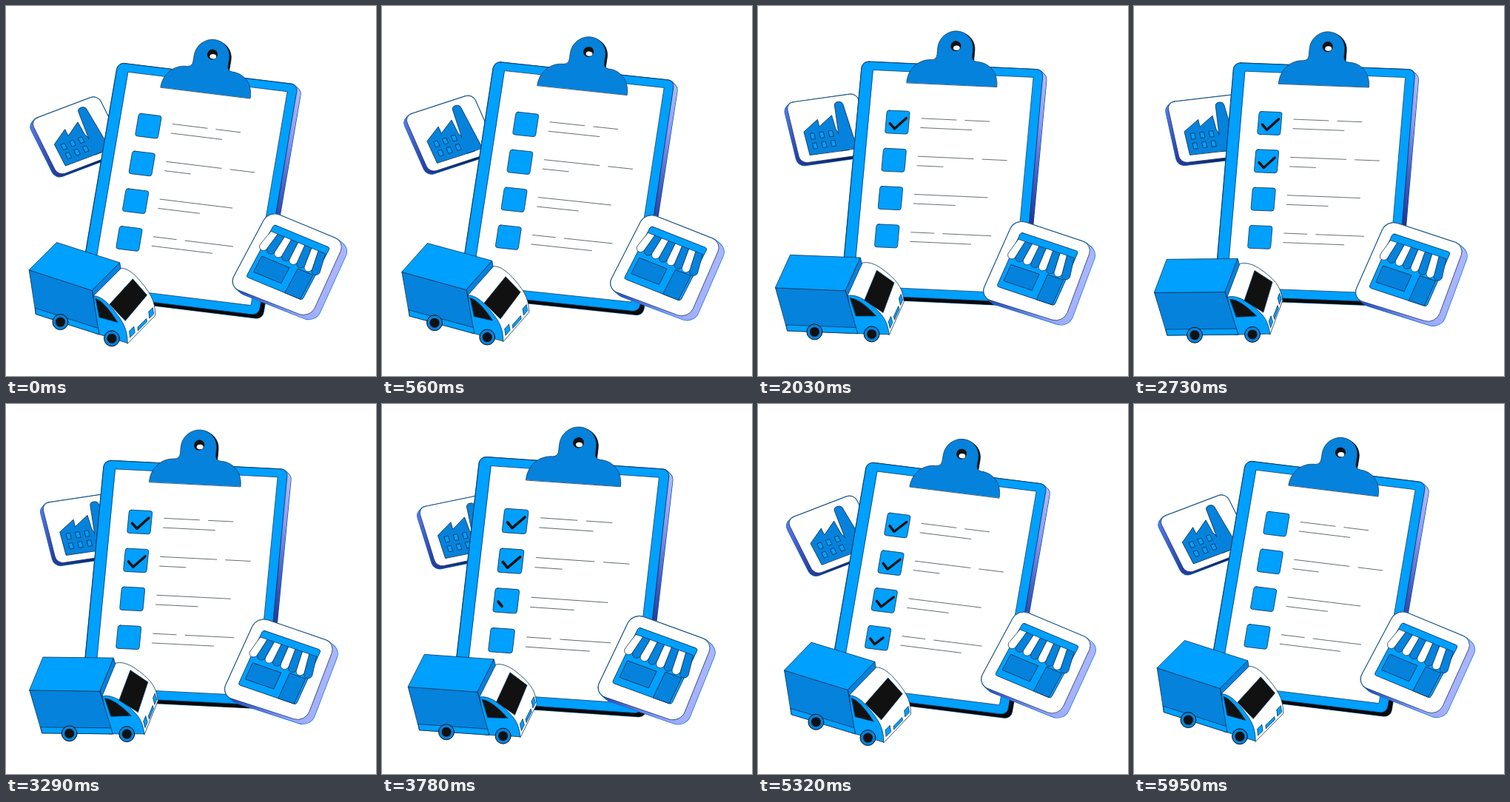
Recreate the animation shown at these times as an HTML page with a canvas. Size 500 px wide and 500 px high, loop 6020 ms.

```html
<!DOCTYPE html>
<html lang="en">
<head>
<meta charset="utf-8">
<title>Delivery checklist</title>
<style>
html, body { margin: 0; width: 100%; height: 100%; overflow: hidden; background: #fff; }
canvas { display: block; width: 500px; height: 500px; }
</style>
</head>
<body>
<canvas id="stage" width="500" height="500"></canvas>
<script>
const ctx = document.getElementById('stage').getContext('2d');
const LOOP = 6020, STEP = 70, CYCLE = 5950;
const BRIGHT = '#00a0ff', MID = '#0582dc', LINE = '#0b3558', INK = '#111';
const RAD = Math.PI / 180;
const clamp = v => Math.max(0, Math.min(1, v));

// everything floats on one slow sine per coordinate
const turn = t => 2 * Math.PI * t / CYCLE;
const sway = (t, mean, c, s) => mean + c * Math.cos(turn(t)) + s * Math.sin(turn(t));

// short swell of the board and the shop
const swell = t => Math.cos(Math.PI / 2 * Math.min(1, Math.abs(t - 3780) / 750)) ** 2;

function pose({ x, y, angle, skew, scale = 1 }, dx = 0, dy = 0) {
  const r = angle * RAD, v = r + skew * RAD;
  ctx.setTransform(scale * Math.cos(r), scale * Math.sin(r),
    -scale * Math.sin(v), scale * Math.cos(v), x + dx, y + dy);
}

function paint(path, fill, stroke = LINE, width = 0.8) {
  if (fill) { ctx.fillStyle = fill; ctx.fill(path); }
  if (stroke) { ctx.strokeStyle = stroke; ctx.lineWidth = width; ctx.stroke(path); }
}

function box(x0, y0, x1, y1, r = 0) {
  const p = new Path2D();
  p.roundRect(x0, y0, x1 - x0, y1 - y0, r);
  return p;
}

function poly(points) {
  const p = new Path2D();
  points.forEach(([x, y]) => p.lineTo(x, y));
  p.closePath();
  return p;
}

function rounded(points, r) {
  const p = new Path2D(), [a, b] = [points[0], points[1]];
  p.moveTo((a[0] + b[0]) / 2, (a[1] + b[1]) / 2);
  points.forEach((_, i) => {
    const corner = points[(i + 1) % points.length], next = points[(i + 2) % points.length];
    p.arcTo(...corner, ...next, r);
  });
  p.closePath();
  return p;
}

function disc(x, y, rx, ry = rx) {
  const p = new Path2D();
  p.ellipse(x, y, rx, ry, 0, 0, 7);
  return p;
}

function gradient(x0, y0, x1, y1, colors) {
  const g = ctx.createLinearGradient(x0, y0, x1, y1);
  colors.forEach((color, i) => g.addColorStop(i / (colors.length - 1), color));
  return g;
}

// sweeps a shape along a screen offset to give it thickness
function extrude(at, path, dx, dy, fill, edge) {
  for (const outline of [true, false]) {
    for (let i = 8; i >= 0; i--) {
      pose(at, dx * i / 8, dy * i / 8);
      if (outline) paint(path, null, edge, 1.4);
      else paint(path, fill, null);
    }
  }
}

function drawFactory(t) {
  const at = {
    x: sway(t, 100.5, -3.4, -8), y: sway(t, 170.7, 4.2, -3.7),
    angle: sway(t, -14, -6.8, 2.8), skew: -5.7
  };
  const tile = box(-48.5, -42, 48.5, 42, 10);
  extrude(at, tile, -3.5, 4, gradient(-48, -40, 20, 42, ['#5f78e8', '#2c40a8', '#101c58']), '#0878cc');
  paint(tile, '#fff', LINE, 0.7);

  paint(poly([[-33.5, 32.5], [-34, 0], [-12, -14], [-12, -4], [8, -17], [9, 2], [20, 32.5]]), MID);
  paint(new Path2D('M9 32.5 L15 -30 Q16 -34 20.5 -34 Q25.5 -34 26.5 -30 L31 32 Z'), MID);
  paint(box(5, 10, 22, 32), MID, null);
  for (const y of [7.5, 21])
    for (let x = -23.5; x < 3; x += 12.5)
      paint(box(x - 2.6, y - 4, x + 2.6, y + 4), BRIGHT);
}

// per row: end of the first stroke, span of the next one, end of the lower line
const ROWS = [[79, 91, 124, 101], [107, 119, 152, 67], [130, 130, 130, 88], [63, 75, 140, 114]];
const ROW = 51.5;

function drawTick(part) {
  if (part <= 0) return;
  const first = clamp(part * 3), rest = clamp(part * 1.5 - 0.5);
  ctx.beginPath();
  ctx.moveTo(-10, 2);
  ctx.lineTo(-10 + 7 * first, 2 + 7 * first);
  if (rest > 0) ctx.lineTo(-3 + 14.5 * rest, 9 - 15 * rest);
  ctx.strokeStyle = INK;
  ctx.lineWidth = 3.4;
  ctx.stroke();
}

function drawRow(t, i) {
  const [a, b, c, d] = ROWS[i];
  paint(box(-15.5, -15.5, 15.5, 15.5, 3), BRIGHT);
  paint(new Path2D(`M32 -6.6H${a}M${b} -6.6H${c}M32 6H${d}`), null, '#5b676d', 0.9);
  const drawn = (t - 3675 + 1330 * (2 - i)) / 400, left = (5880 - t) / 210;
  drawTick(Math.min(clamp(drawn), clamp(left)));
}

function drawBoard(t) {
  const k = swell(t);
  const at = {
    x: sway(t, 187.2, 5.2, 4.8), y: sway(t, 160.7, 1.4, -3.5) - 4 * k,
    angle: sway(t, 4.7, 2.3, -1), skew: 2.65, scale: 1 + 0.05 * k
  };
  const back = box(-55, -80, 190, 236, 9);
  extrude(at, back, 5, 5, gradient(0, -80, 0, 190,
    ['#b4bcff', '#8c9bf2', '#4a62c8', '#22369a', '#080808']), '#0a4f8a');
  paint(back, BRIGHT);
  paint(box(-39, -69, 177.5, 224), '#fff', LINE, 0.7);

  ctx.save();
  ctx.translate(2.6, 1.4);
  paint(new Path2D('M45 -86 V-103 A23.8 23.8 0 0 1 92.6 -103 V-86 Z'), INK, INK);
  ctx.restore();
  paint(new Path2D('M7.5 -54 C7 -72 20 -86.5 38 -86.5 Q45 -87 45 -94 V-103 ' +
    'A23.8 23.8 0 0 1 92.6 -103 V-94 Q92.6 -87 99.6 -86.5 C117 -86.5 130 -72 129.5 -54 Z'), MID, LINE, 0.7);
  paint(disc(69.2, -106.5, 7), INK, null);
  paint(disc(70.5, -104, 4.4, 3.2), '#fff', null);

  for (let i = 0; i < ROWS.length; i++) {
    drawRow(t, i);
    ctx.translate(0, ROW);
  }
}

function drawShop(t) {
  const at = {
    x: sway(t, 373.9, 5, 5.3), y: sway(t, 353.8, -5.2, 1.3),
    angle: sway(t, 20.5, 2, -1.1), skew: 5.5, scale: 1 + 0.04 * swell(t)
  };
  const tile = rounded([[-55, -58], [56, -58], [63, 56], [-55, 58]], 15);
  extrude(at, tile, 7, 6, gradient(-50, 40, 65, 20, ['#2c46b8', '#5a70dc', '#8f9cff', '#aab4ff']), '#0878cc');
  paint(tile, '#fff', LINE, 0.7);

  paint(box(-40, -43, 42, 37, 3), BRIGHT);
  paint(box(-34, 3, 6, 27), MID);
  paint(box(17, 0, 39, 37), MID);
  for (let i = 0; i < 8; i++) {
    const top = -39 + i * 9.9, low = -44 + i * 11.2, y = -10 + i * 0.5;
    const p = new Path2D();
    p.moveTo(top, -33);
    p.lineTo(top + 9.9, -33);
    p.lineTo(low + 11.2, y);
    p.arc(low + 5.6, y, 5.6, 0, Math.PI);
    p.closePath();
    paint(p, i % 2 ? MID : '#fff', LINE, 0.7);
  }
}

function drawTruck(t) {
  // one heading steers the length, height and depth axes
  const h = sway(t, 8.65, 9.1, -1.8);
  const axis = (len, deg) => [len * Math.cos(deg * RAD), len * Math.sin(deg * RAD)];
  const [lx, ly] = axis(95.5 - 0.33 * h, h);
  const [hx, hy] = axis(60.5, 73 + 0.44 * h);
  const [dx, dy] = axis(48.3 + 0.26 * h, 1.33 * h - 68.5);
  const ox = sway(t, 30, 0.9, -7.4), oy = sway(t, 372.3, -15.5, 0.2);
  const at = (a, b, c = 0) => [ox + a * lx + b * hx + c * dx, oy + a * ly + b * hy + c * dy];
  const face = points => poly(points.map(p => at(...p)));
  ctx.setTransform(1, 0, 0, 1, 0, 0);

  paint(face([[1, 0, 0], [1, 0, 1], [1, 0.3, 1], [1, 0.3, 0]]), MID);

  // nose profile, the same on the near and far side
  const nose = (p, c) => {
    p.lineTo(...at(1.01, 0.12, c));
    p.quadraticCurveTo(...at(1.13, 0.07, c), ...at(1.25, 0.22, c));
    p.quadraticCurveTo(...at(1.38, 0.4, c), ...at(1.43, 0.56, c));
    p.quadraticCurveTo(...at(1.48, 0.72, c), ...at(1.45, 0.99, c));
  };
  const front = new Path2D();
  front.moveTo(...at(1.01, 0.12));
  nose(front, 1);
  front.lineTo(...at(1.45, 1));
  front.closePath();
  paint(front, '#fff');

  const side = new Path2D();
  nose(side, 0);
  side.lineTo(...at(0.95, 1));
  side.closePath();
  paint(side, BRIGHT);

  paint(face([[1.2, 0.29, 0.1], [1.21, 0.23, 0.93], [1.42, 0.48, 0.9], [1.42, 0.56, 0.1]]), INK);
  const pane = new Path2D();
  pane.moveTo(...at(1.04, 0.17));
  pane.quadraticCurveTo(...at(1.18, 0.18), ...at(1.34, 0.57));
  pane.lineTo(...at(1.05, 0.59));
  pane.closePath();
  paint(pane, INK);

  const badge = (b0, b1, c0, c1) =>
    paint(face([[1.455, b0, c0], [1.455, b0, c1], [1.455, b1, c1], [1.455, b1, c0]]), BRIGHT);
  badge(0.78, 0.92, 0.1, 0.27);
  badge(0.78, 0.92, 0.8, 0.95);
  badge(0.87, 0.94, 0.38, 0.7);

  paint(face([[0, 0], [1, 0], [1, 1], [0, 1]]), MID);
  paint(face([[0, 0.86], [1, 0.86], [1, 1], [0, 1]]), BRIGHT);
  paint(face([[0, 0, 0], [0, 0, 1], [1, 0, 1], [1, 0, 0]]), BRIGHT);

  for (const a of [0.385, 1.2]) {
    const [x, y] = at(a, 1);
    paint(disc(x, y, 10.5), MID, INK, 1);
    paint(disc(x, y, 6.5), INK, null);
  }
}

function draw(now) {
  const t = Math.floor((now % LOOP) / STEP) * STEP % CYCLE;
  ctx.setTransform(1, 0, 0, 1, 0, 0);
  ctx.fillStyle = '#fff';
  ctx.fillRect(0, 0, 500, 500);
  ctx.lineCap = ctx.lineJoin = 'round';
  drawFactory(t);
  drawBoard(t);
  drawShop(t);
  drawTruck(t);
}

let start;
function tick(now) {
  start ??= now;
  draw(now - start);
  requestAnimationFrame(tick);
}
draw(0);
requestAnimationFrame(tick);
</script>
</body>
</html>
```
